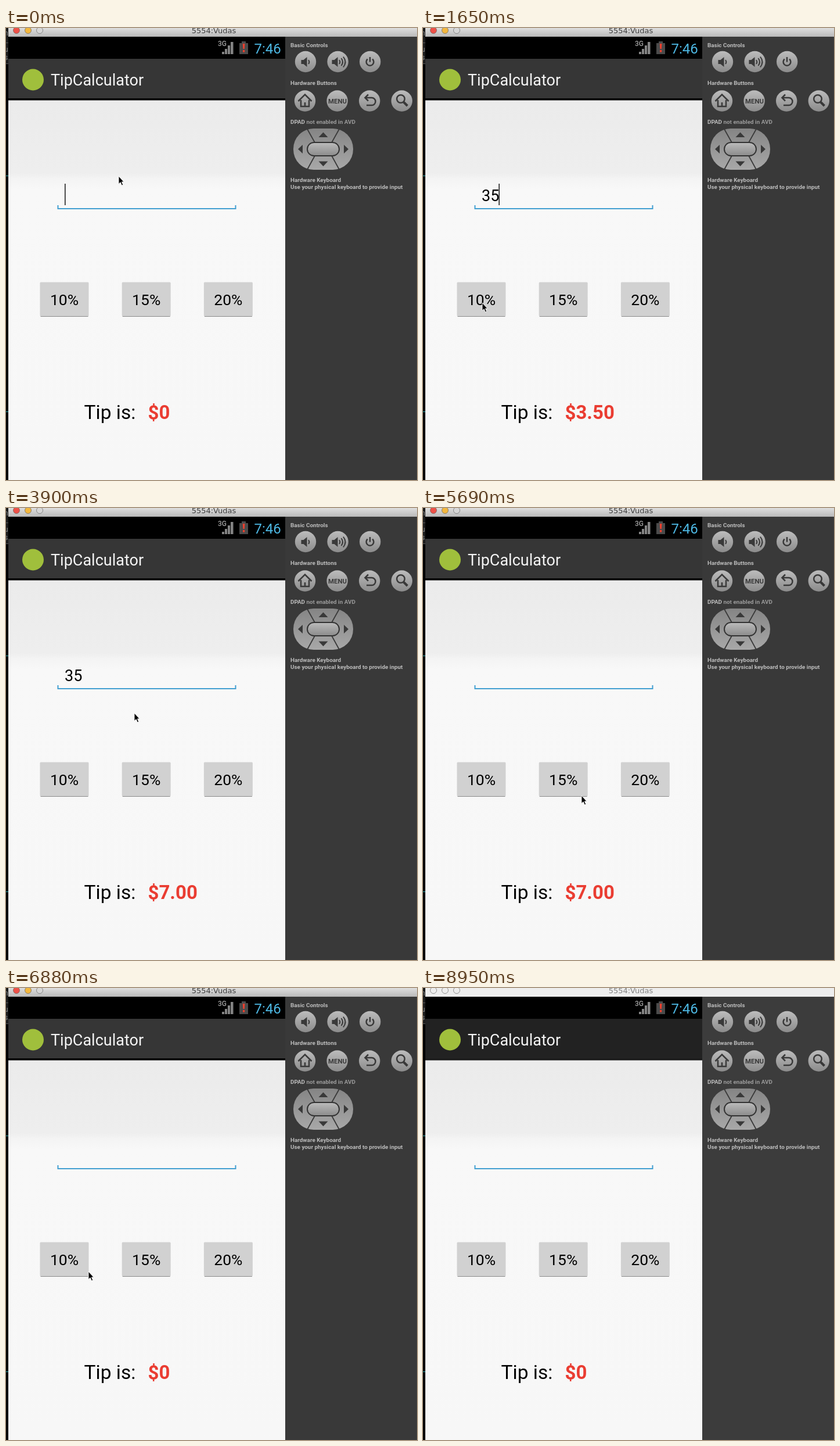
An HTML page for the animation above (9020 ms loop, 708 px wide and 778 px high).

```html
<!DOCTYPE html>
<html lang="en">
<head>
<meta charset="utf-8">
<title>Tip calculator</title>
<style>
  html, body { margin: 0; width: 100%; height: 100%; overflow: hidden; background: #000; }
  svg { display: block; width: 100vw; height: 100vh; }
  text { font-family: Roboto, sans-serif; white-space: pre; }
  .label { font-size: 9.9px; font-weight: 700; fill: #bcbcbc; }
  .icon { fill: none; stroke: #393939; stroke-width: 2.5; }
  .solid { fill: #393939; }
</style>
</head>
<body>
<svg viewBox="0 0 708 778">
  <defs>
    <linearGradient id="metal" x2="0" y2="1">
      <stop stop-color="#bcbcbc"/><stop offset="1" stop-color="#8b8b8b"/>
    </linearGradient>
    <linearGradient id="pad" x2="0" y2="1">
      <stop stop-color="#858585"/><stop offset="1" stop-color="#a8a8a8"/>
    </linearGradient>
    <linearGradient id="bar" x2="0" y2="1">
      <stop stop-color="#dedede"/><stop offset="1" stop-color="#b9b9b9"/>
    </linearGradient>
    <linearGradient id="page" gradientUnits="userSpaceOnUse" y1="125" x2="0" y2="778">
      <stop stop-color="#ebebeb"/><stop offset=".19" stop-color="#eee"/>
      <stop offset=".207" stop-color="#f4f4f4"/><stop offset=".235" stop-color="#f8f8f8"/>
      <stop offset="1" stop-color="#f7f7f7"/>
    </linearGradient>
    <clipPath id="edge"><rect width="4" height="778"/></clipPath>
  </defs>

  <!-- desktop edge -->
  <g clip-path="url(#edge)">
    <rect width="4" height="62" fill="#1c1c1c"/>
    <path d="M0 25.5H4M0 61.5H4" stroke="#555"/>
    <g fill="#8a8a8a" font-size="12">
      <text x="-3" y="13">n</text><text x="-3" y="41">u</text><text x="-3" y="55">s</text>
    </g>
    <path d="M0 254.5H4M0 660.5H4" stroke="#27a5a8"/>
  </g>

  <!-- window title -->
  <rect id="titleBar" x="4" width="704" height="15"/>
  <g id="lights"></g>
  <text id="title" x="358" y="9" text-anchor="middle" style="font:13px 'DejaVu Sans',sans-serif">5554:Vudas</text>

  <!-- status bar -->
  <rect x="4" y="15" width="477" height="38"/>
  <text x="365" y="31" font-size="12" font-weight="500" fill="#a0a0a0">3G</text>
  <path d="M372 45v-4h4v4zM377 45v-9h4v9zM382 45v-15h4v15zM387 45v-21h4.5v21z" fill="#858585"/>
  <path d="M402 26h4v-3h7v3h4v19h-15z" fill="#4b4b4b"/>
  <path d="M407.8 27h3.6l-.6 9h-2.4zM408 38h3.2v3.5h-3.2z" fill="#f0402e"/>
  <text x="427.5" y="43.5" font-size="24" fill="#4db8e4">7:46</text>

  <!-- app -->
  <rect id="header" x="4" y="53" width="477" height="69"/>
  <rect id="divider" x="4" y="121" width="477" height="4"/>
  <circle cx="46.5" cy="89" r="18.5" fill="#a0bf3c"/>
  <text x="77" y="98.5" font-size="27" fill="#f4f4f4">TipCalculator</text>
  <rect x="4" y="124.5" width="477" height="654" fill="url(#page)"/>
  <path d="M89.5 305V311H395.5V305" fill="none" stroke="#429fd1" stroke-width="2"/>
  <text id="amount" x="101" y="297.5" font-size="27"></text>
  <rect id="caret" y="268" width="1.6" height="37" fill="#222"/>
  <g id="buttons"></g>
  <text x="134.5" y="673" font-size="33.5">Tip is:</text>
  <text id="tip" x="244.5" y="673" font-size="33" font-weight="700" fill="#ea3d32"></text>

  <!-- emulator controls -->
  <rect id="panel" x="481" y="15" width="227" height="763"/>
  <g class="label">
    <text x="490" y="33">Basic Controls</text>
    <text x="490" y="97.5">Hardware Buttons</text>
    <text x="490" y="165">DPAD<tspan fill="#9a9a9a"> not enabled in AVD</tspan></text>
    <text x="490" y="265">Hardware Keyboard</text>
    <text x="490" y="276.5">Use your physical keyboard to provide input</text>
  </g>
  <g id="knobs" fill="url(#metal)"></g>
  <path class="solid" d="M508.500 55h4l6-5v17l-6-5h-4zM561.5 55h4l6-5v17l-6-5h-4z"/>
  <g class="icon">
    <path d="M521 55q2.5 3.5 0 7M574 55q2.5 3.5 0 7M577.5 52q5 6.5 0 13M581 49.5q7 9 0 18" stroke-width="2"/>
    <path d="M622.8 53.5a6.4 6.4 0 1 0 8.400 0M627 50V58.5"/>
    <path d="M503.5 126L515 114.5 526.5 126M508 124V135H522V124M515 135V128"/>
    <path d="M624 114.5L618.5 120 624 125.5M618.5 120H630a6.5 6.5 0 0 1 0 13H621"/>
    <circle cx="680" cy="122" r="6.8"/>
    <path d="M685 127.5L691.5 134" stroke-width="4"/>
  </g>
  <text class="solid" x="571" y="130" font-size="11.4" font-weight="700" text-anchor="middle">MENU</text>
  <rect x="495" y="173" width="103" height="71" rx="35" fill="url(#pad)"/>
  <path d="M519 174L533 199M574 174L560 199M519 243.5L533 218M574 243.5L560 218" stroke="#3a3a3a" stroke-width="1.8"/>
  <rect x="519" y="197" width="55" height="23" rx="11.5" fill="url(#metal)" stroke="#333" stroke-width="2"/>
  <path class="solid" d="M546.5 179.5l8 8.5h-16zM546.5 238l8-8.5h-16zM503 208.5l8-7.5v15zM590 208.5l-8-7.5v15z"/>

  <path id="pointer" d="M0 0V13.5L3.2 10.7 5.4 16 7.7 15 5.5 9.900H9.2Z" stroke="#fff" stroke-width=".9"/>
</svg>
<script>
const LOOP = 9020;
const STEP = 149.16; // the screen refreshes once per step; all cues below count steps
const BLINK = 500;
const POINTER_GONE = 53, WINDOW_BLUR = 57;

const home = { x: 194, y: 255 };
// Pointer strokes: from step, to step, destination.
const strokes = [
  [3, 5, 201, 320], [5, 9, 102, 473],
  [11, 13, 222, 477],
  [15, 16, 351, 476], [16, 18, 387, 476],
  [23, 26, 221, 353], [26, 29, 172, 296],
  [36, 38, 273, 495], [38, 40, 383, 478], [40, 42, 248, 477],
  [44, 46, 142, 488], [46, 47, 84, 521], [47, 51, 636, 106], [51, 52, 622, 130]
];
const typing = [{ step: 0, text: "" }, { step: 1, text: "3" }, { step: 2, text: "35" },
  { step: 33, text: "3" }, { step: 35, text: "" }];
const rates = [10, 15, 20];
const presses = [{ step: 10, button: 0 }, { step: 14, button: 1 }, { step: 22, button: 2 }, { step: 42, button: 1 }];

const $ = id => document.getElementById(id);
const latest = (cues, step) => cues.findLast(cue => cue.step <= step);
const show = (node, on) => node.setAttribute("visibility", on ? "visible" : "hidden");
const paint = (id, color) => $(id).setAttribute("fill", color);

$("buttons").innerHTML = rates.map((rate, i) => {
  const x = 58.5 + i * 141.2;
  return `
    <rect class="glow" x="${x - 6}" y="431" width="96" height="72" rx="4" fill="#33b5e5" opacity=".4"/>
    <rect class="face" x="${x}" y="437.5" width="84" height="58.5" rx="1.5"/>
    <path d="M${x + 1} 496.5h82" stroke="#8c8c8c"/>
    <text x="${x + 42}" y="477" font-size="26.5" text-anchor="middle">${rate}%</text>`;
}).join("");

const knobRow = (count, x, y) => Array.from({ length: count }, (_, i) =>
  `<circle cx="${x + i * 55.6}" cy="${y}" r="18.2"/>`).join("");
$("knobs").innerHTML = knobRow(3, 516, 58) + knobRow(4, 515, 125.5);

$("lights").innerHTML = ["#ee5148", "#f3b73f", "#d6d6d6"].map((color, i) =>
  `<circle cx="${18 + i * 20}" cy="4" r="5.5" fill="${color}" stroke="#555" stroke-opacity=".6"/>`).join("");

const glows = document.querySelectorAll(".glow");
const faces = document.querySelectorAll(".face");

function pointerAt(step) {
  let { x, y } = home;
  for (const [from, to, toX, toY] of strokes) {
    const part = Math.min(1, Math.max(0, (step - from) / (to - from)));
    x += (toX - x) * part;
    y += (toY - y) * part;
  }
  return `translate(${x} ${y})`;
}

// The tip appears one step after a press and uses the amount typed by then.
function tipAt(step) {
  const press = latest(presses, step - 1);
  const tip = press ? latest(typing, press.step).text * rates[press.button] / 100 : 0;
  return "$" + (tip ? tip.toFixed(2) : 0);
}

function drawWindow(active) {
  paint("titleBar", active ? "url(#bar)" : "#ededed");
  paint("title", active ? "#3c3c3c" : "#808080");
  paint("header", active ? "#363636" : "#222");
  paint("divider", active ? "#050505" : "#1c1c1c");
  paint("panel", active ? "#393939" : "#3c3c3c");
  for (const light of $("lights").children) light.setAttribute("fill-opacity", active ? 1 : 0);
}

function draw(t) {
  const step = Math.floor(t / STEP);
  const key = latest(typing, step);
  const press = latest(presses, step);

  $("pointer").setAttribute("transform", pointerAt(step));
  show($("pointer"), step < POINTER_GONE);

  $("amount").textContent = key.text;
  $("tip").textContent = tipAt(step);
  $("caret").setAttribute("x", 101 + key.text.length * 14.7);
  const sinceKey = (step - key.step) * STEP + 100;
  show($("caret"), sinceKey % (2 * BLINK) < BLINK);

  faces.forEach((face, i) => {
    const down = press?.step === step && press.button === i;
    face.setAttribute("fill", down ? "#a9cbd8" : "#d1d1d1");
    show(glows[i], down);
  });
  drawWindow(step < WINDOW_BLUR);
}

const start = performance.now();
function tick() {
  draw((performance.now() - start) % LOOP);
  requestAnimationFrame(tick);
}
tick();
</script>
</body>
</html>
```
